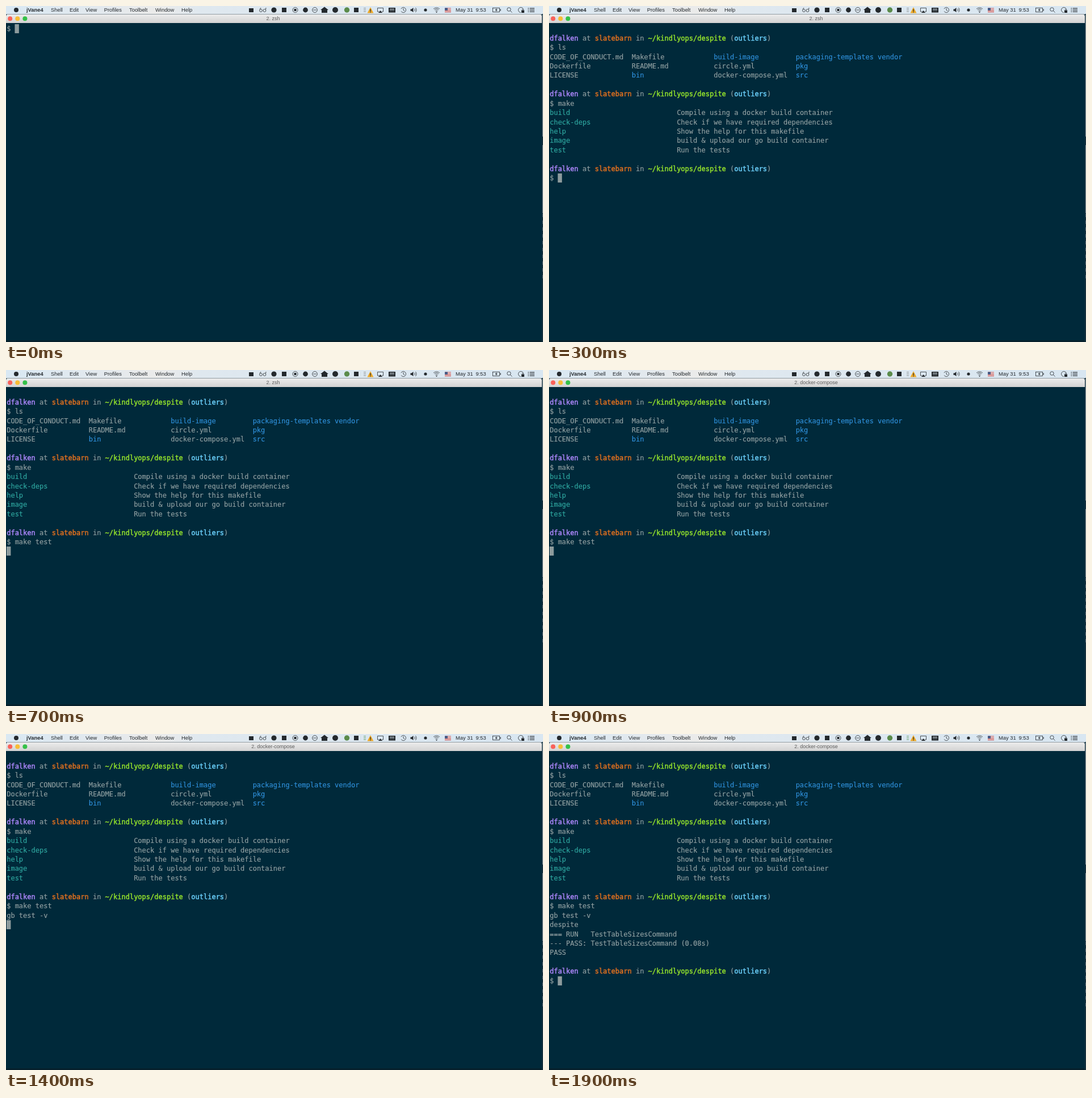
An HTML page with a canvas that plays this animation: 946 px wide and 592 px high, repeating every 2000 ms.

```html
<!DOCTYPE html>
<html lang="en">
<head>
<meta charset="utf-8">
<title>Terminal session</title>
<style>
html, body { margin: 0; width: 100%; height: 100%; overflow: hidden; background: #00293a; }
canvas { display: block; }
</style>
</head>
<body>
<canvas id="stage" width="946" height="592"></canvas>
<script>
const ctx = document.getElementById('stage').getContext('2d');
const LOOP = 2000, COL = 7.224, ROW = 16.44, LEFT = 1.2, TOP = 40;
const MONO = '12px "DejaVu Sans Mono", monospace';
const SANS = '"Liberation Sans", Arial, sans-serif';
const INK = '#24292d';
const C = {
  text: '#93a1a3', user: '#ac86fa', host: '#e0701f', path: '#94e22c',
  branch: '#6bd0fb', dir: '#2f90da', target: '#2fa8a1'
};

function rect(x, y, w, h, fill) {
  ctx.fillStyle = fill;
  ctx.fillRect(x, y, w, h);
}

function disc(x, y, r, fill = INK) {
  ctx.fillStyle = fill;
  ctx.beginPath();
  ctx.arc(x, y, r, 0, Math.PI * 2);
  ctx.fill();
}

function ring(x, y, r, from = 0, to = Math.PI * 2) {
  ctx.beginPath();
  ctx.arc(x, y, r, from, to);
  ctx.stroke();
}

function line(...p) {
  ctx.beginPath();
  for (let i = 0; i < p.length; i += 2) ctx.lineTo(p[i], p[i + 1]);
  ctx.stroke();
}

function poly(fill, ...p) {
  ctx.fillStyle = fill;
  ctx.beginPath();
  for (let i = 0; i < p.length; i += 2) ctx.lineTo(p[i], p[i + 1]);
  ctx.fill();
}

function label(text, x, y, font, fill, align = 'left') {
  ctx.font = font;
  ctx.fillStyle = fill;
  ctx.textAlign = align;
  ctx.fillText(text, x, y);
}

// Terminal contents

// A thin outline gives the glyphs their slightly heavier weight.
function put(row, col, text, color = C.text, weight = 0.15) {
  const x = LEFT + col * COL, y = TOP + row * ROW + 4.2;
  label(text, x, y, MONO, color);
  ctx.strokeStyle = color;
  ctx.lineWidth = weight;
  ctx.strokeText(text, x, y);
}

function cursor(row, col) {
  rect(LEFT + col * COL - 0.2, Math.round(TOP + row * ROW - 8), 7.4, 16, '#8d9b9d');
}

function prompt(row, command = '') {
  const parts = [
    ['dfalken', C.user], [' at '], ['slatebarn', C.host], [' in '],
    ['~/kindlyops/despite', C.path], [' ('], ['outliers', C.branch], [')']
  ];
  let col = 0;
  for (const [text, color] of parts) {
    put(row, col, text, color, color ? 0.45 : 0.15);
    col += text.length;
  }
  put(row + 1, 0, '$ ' + command);
}

function listing() {
  prompt(1, 'ls');
  const columns = [
    ['CODE_OF_CONDUCT.md', 'Dockerfile', 'LICENSE'],
    ['Makefile', 'README.md', 'bin/'],
    ['build-image/', 'circle.yml', 'docker-compose.yml'],
    ['packaging-templates/', 'pkg/', 'src/'],
    ['vendor/']
  ];
  columns.forEach((names, i) => names.forEach((name, j) => {
    const isDir = name.endsWith('/');
    put(3 + j, i * 20, name.replace('/', ''), isDir ? C.dir : C.text);
  }));
}

function makeHelp() {
  const targets = [
    ['build', 'Compile using a docker build container'],
    ['check-deps', 'Check if we have required dependencies'],
    ['help', 'Show the help for this makefile'],
    ['image', 'build & upload our go build container'],
    ['test', 'Run the tests']
  ];
  targets.forEach(([name, info], i) => {
    put(9 + i, 0, name, C.target);
    put(9 + i, 31, info);
  });
}

function terminal(t) {
  if (t < 100) {
    put(0, 0, '$');
    cursor(0, 2);
    return;
  }
  listing();
  if (t < 300) {
    const typed = t < 200 ? '' : 'make';
    prompt(7, typed);
    cursor(8, 2 + typed.length);
    return;
  }
  prompt(7, 'make');
  makeHelp();
  const typed = 'make test'.slice(0, t < 500 ? 0 : t < 600 ? 6 : 9);
  prompt(15, typed);
  if (t < 700) return cursor(16, 2 + typed.length);
  if (t < 1000) return cursor(17, 0);
  put(17, 0, 'gb test -v');
  if (t < 1900) return cursor(18, 0);
  ['despite', '=== RUN   TestTableSizesCommand',
   '--- PASS: TestTableSizesCommand (0.08s)', 'PASS'
  ].forEach((text, i) => put(18 + i, 0, text));
  prompt(23);
  cursor(24, 2);
}

// Menu bar and window frame

function statusIcons(t) {
  ctx.strokeStyle = INK;
  ctx.lineWidth = 0.8;
  disc(18, 7, 4);
  rect(428, 4, 8, 7, INK);
  ring(449, 8, 2.4);
  ring(455.5, 8, 2.4);
  line(447, 6, 449, 3);
  line(457.5, 6, 458, 3);
  disc(472, 7, 4.6);
  rect(486, 3, 8, 8, INK);
  ring(509.5, 7, 4.5);
  rect(507.5, 5, 4, 4, INK);
  disc(527.5, 7, 4.4);
  ring(544, 7, 4.4);
  line(541, 7, 547, 7);
  poly(INK, 554, 7, 561, 1.5, 568, 7, 566, 7, 566, 12, 556, 12, 556, 7);
  disc(580, 7, 5);
  disc(600.5, 7, 4.7, '#5b8b4b');
  rect(613, 3, 8, 8, INK);
  for (let i = 0; i < 3; i++) rect(630, 3 + i * 3, 4, 1.5, t < 1000 ? '#a5adb2' : '#8db797');
  poly('#eda928', 636.5, 12.5, 642, 2, 647.5, 12.5);
  rect(641.4, 5.5, 1.3, 4, INK);
  rect(641.4, 10.2, 1.3, 1.3, INK);
  line(657, 10, 654.5, 10, 654.5, 3.5, 664.5, 3.5, 664.5, 10, 662, 10);
  poly(INK, 656, 12, 659.5, 8, 663, 12);
  rect(674, 3, 12, 8.5, INK);
  rect(676, 5, 8, 1, '#dce7ef');
  rect(676, 7.5, 8, 1, '#9aa7b0');
  ring(700, 7, 4.5, -2.7, 2.6);
  line(700, 4, 700, 7.3, 702.3, 8.5);
  poly(INK, 712.5, 5.5, 714.5, 5.5, 717.5, 3, 717.5, 11, 714.5, 8.8, 712.5, 8.8);
  ring(717.5, 7, 3, -0.8, 0.8);
  ring(717.5, 7, 5.5, -0.8, 0.8);
  disc(739, 7, 2.6);
  for (const r of [3, 5.5, 8]) ring(758.5, 11, r, -2.3, -0.84);
  disc(758.5, 10.7, 1);
  for (let i = 0; i < 7; i++) rect(773, 3.5 + i * 1.1, 11, 1.1, i % 2 ? '#efe5e4' : '#c85353');
  rect(773, 3.5, 5, 4.2, '#405783');
  ctx.strokeRect(857.5, 3.5, 12, 7);
  rect(870.5, 5.5, 1.2, 3, INK);
  poly(INK, 864.5, 4, 861.5, 7.4, 863.6, 7.4, 862.8, 10, 866, 6.5, 864, 6.5);
  ring(886, 6, 3.2);
  line(888.3, 8.3, 891.5, 11.5);
  ring(907, 7, 4.5, 1.6, 6.1);
  rect(908, 7.5, 5, 4.5, INK);
  ring(910.5, 7.5, 1.5, Math.PI, 0);
  for (let i = 0; i < 3; i++) {
    rect(919.5, 3.5 + i * 3, 1.5, 1.2, INK);
    rect(922.5, 3.5 + i * 3, 8.5, 1.2, INK);
  }
}

function menuBar(t) {
  const sky = ctx.createLinearGradient(0, 0, 946, 0);
  sky.addColorStop(0, '#d9e8f3');
  sky.addColorStop(0.2, '#e4e9ed');
  sky.addColorStop(0.28, '#ebebea');
  sky.addColorStop(0.36, '#dfe8ef');
  sky.addColorStop(1, '#d8e6f1');
  rect(0, 0, 946, 14, sky);
  label('jVane4', 36, 10.4, 'bold 9.4px ' + SANS, INK);
  const items = { Shell: 79, Edit: 112, View: 140, Profiles: 172.7, Toolbelt: 217, Window: 263, Help: 309 };
  for (const name in items) label(name, items[name], 10.4, '9.4px ' + SANS, INK);
  label('May 31', 792, 10.4, '9.4px ' + SANS, INK);
  label('9:53', 827.5, 10.4, '9.4px ' + SANS, INK);
  statusIcons(t);
}

function windowFrame(t) {
  // slivers of the desktop at the right edge
  rect(944, 14, 2, 578, '#17323e');
  rect(945, 15, 1, 215, '#8b9aa2');
  rect(945, 245, 1, 120, '#84939b');
  for (let y = 366; y < 480; y += 12) rect(945, y, 1, 6, '#566b76');
  rect(0, 30, 944, 559, '#00293a');
  rect(0, 589, 944, 3, '#06202c');

  rect(0, 14, 944, 1, '#929da3');
  const bar = ctx.createLinearGradient(0, 15, 0, 30);
  bar.addColorStop(0, '#ececec');
  bar.addColorStop(1, '#d2d2d2');
  ctx.fillStyle = bar;
  ctx.beginPath();
  ctx.roundRect(0, 15, 944, 15, [3, 3, 0, 0]);
  ctx.fill();
  ['#f9625a', '#f8bd36', '#34c149'].forEach((color, i) => disc(7.2 + i * 13.1, 22.2, 4, color));
  const title = t < 900 ? '2. zsh' : '2. docker-compose';
  label(title, 470.5, 25.4, '9px ' + SANS, '#5d5d5d', 'center');
}

function draw(now) {
  const t = now % LOOP;
  rect(0, 0, 946, 592, '#00293a');
  menuBar(t);
  windowFrame(t);
  terminal(t);
}

let start;
function tick(now) {
  start ??= now;
  draw(now - start);
  requestAnimationFrame(tick);
}
requestAnimationFrame(tick);
</script>
</body>
</html>
```
